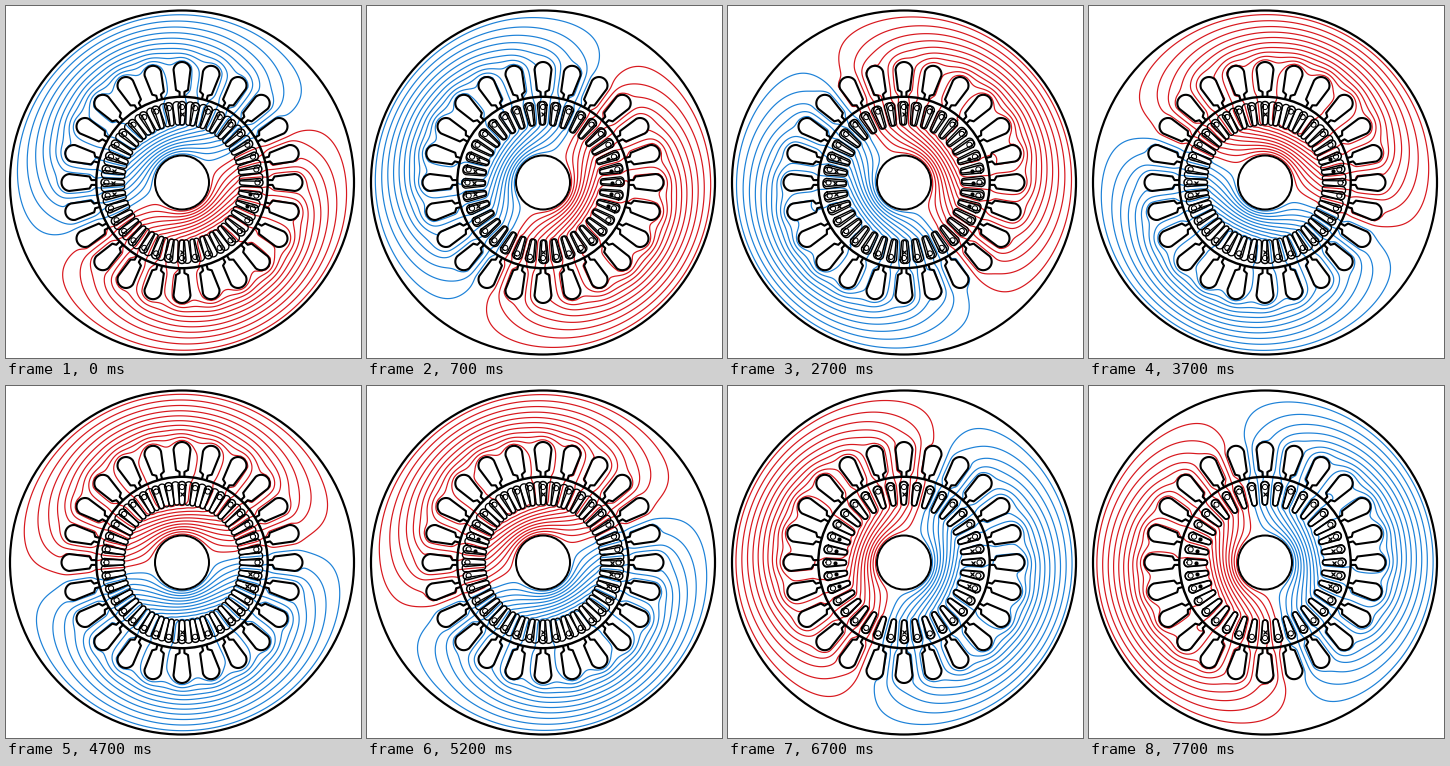
These frames come from a looping animation (355 by 352 pixels, 8 s). A matplotlib script:

```python
import numpy as np
import matplotlib.pyplot as plt
from matplotlib.animation import FuncAnimation
from matplotlib.collections import LineCollection

WIDTH, HEIGHT, DPI = 355, 352, 100
PX = 72 / DPI
SHAFT, GAP, OUTER = 27, 85.7, 172
SLOTS, BARS = 24, 36
STEPS = 17
RED, BLUE = "#d8191f", "#1e82d8"

# Half of the machine is solved; the other half has the opposite sign.
HALF = 240
CELL = np.pi / HALF
LAYERS = round(np.log(OUTER / SHAFT) / CELL)
U = np.linspace(np.log(SHAFT), np.log(OUTER), LAYERS + 1)
THETA = (np.arange(HALF) + 0.5) * CELL


def local(r, theta, count):
    """Radial and sideways position relative to the nearest of count axes."""
    pitch = 2 * np.pi / count
    d = (theta + pitch / 2) % pitch - pitch / 2
    return r * np.cos(d), r * np.sin(d)


def in_slot(r, theta):
    p, q = local(r, theta, SLOTS)
    body = (p > 92) & (p < 112) & (abs(q) < np.interp(p, [92, 112], [6, 8.5]))
    cap = np.hypot(p - 112, q) < 8.5
    neck = (p > 85) & (p <= 92) & (abs(q) < 2.2)
    return body | cap | neck


def in_bar(r, theta):
    p, q = local(r, theta, BARS)
    body = (p > 60) & (p < 77) & (abs(q) < np.interp(p, [60, 77], [2.5, 4]))
    caps = (np.hypot(p - 60, q) < 2.5) | (np.hypot(p - 77, q) < 4)
    slit = (p > 77) & (p < 86) & (abs(q) < 1.2)
    return body | caps | slit


def reluctivity(u, theta):
    r = np.exp(u)[:, None]
    t = theta[None, :]
    air = in_slot(r, t) | in_bar(r, t) | (abs(r - GAP) < 1)
    return np.where(air, 1.0, 1 / 600)


def solve_field():
    """Vector potential for the cosine and sine parts of the slot currents."""
    radial = reluctivity((U[1:] + U[:-1]) / 2, THETA)
    around = reluctivity(U, THETA + CELL / 2)
    r = np.exp(U)[:, None]
    pitch = 2 * np.pi / SLOTS
    axis = np.round(THETA / pitch) * pitch
    density = r**2 * (in_slot(r, THETA[None, :]) & (r > 92))
    load = np.stack([density * np.cos(axis), density * np.sin(axis)], axis=2)

    n = np.arange(HALF)
    nxt = (n + 1) % HALF
    sign = np.where(nxt == 0, 1.0, -1.0)
    inverses, rhs = [], []
    for i in range(1, LAYERS):
        e = around[i]
        block = np.diag(radial[i] + radial[i - 1] + e + np.roll(e, 1))
        block[n, nxt] += sign * e
        block[nxt, n] += sign * e
        b = load[i]
        if inverses:
            c = radial[i - 1]
            block -= c[:, None] * inverses[-1] * c[None, :]
            b = b + c[:, None] * (inverses[-1] @ rhs[-1])
        inverses.append(np.linalg.inv(block))
        rhs.append(b)

    field = np.zeros((LAYERS + 1, HALF, 2))
    for i in range(LAYERS - 1, 0, -1):
        field[i] = inverses[i - 1] @ (rhs[i - 1] + radial[i][:, None] * field[i + 1])
    return np.concatenate([field, -field, field[:, :1]], axis=1)


def place(p, q, angle):
    c, s = np.cos(angle), np.sin(angle)
    return np.column_stack([p * c - q * s, p * s + q * c])


def arc(center, radius, start, end, n=16):
    a = np.radians(np.linspace(start, end, n))
    return center + radius * np.cos(a), radius * np.sin(a)


def slot_outline():
    p, q = arc(112, 8.5, -85, 85, 20)
    p = np.concatenate([[86.5, 90.5, 92.5], p, [92.5, 90.5, 86.5]])
    q = np.concatenate([[-2.4, -2.4, -6], q, [6, 2.4, 2.4]])
    return p, q


def bar_outline():
    top, bottom = arc(77, 4, -85, 85), arc(60, 2.5, 95, 265)
    p = np.concatenate([top[0], bottom[0], top[0][:1]])
    q = np.concatenate([top[1], bottom[1], top[1][:1]])
    return p, q


def ring(shape, count, shift=0.0):
    return [place(*shape, 2 * np.pi * k / count + shift) for k in range(count)]


def black_lines(segments, width):
    lines = LineCollection(segments, colors="black", linewidths=width * PX,
                           capstyle="round", joinstyle="round", zorder=3)
    return ax.add_collection(lines)


def flux_axis(step):
    return np.radians(28 + 16 * step)


fig = plt.figure(figsize=(WIDTH / DPI, HEIGHT / DPI), dpi=DPI, facecolor="white")
ax = fig.add_axes([0, 0, 1, 1])
ax.axis("off")

# Flux lines, one set for each step
part = solve_field()
theta = (np.arange(2 * HALF + 1) + 0.5) * CELL
radius = np.exp(U)[:, None]
X, Y = radius * np.cos(theta), radius * np.sin(theta)
levels = (np.arange(11) + 0.65) / 11.3 * np.hypot(part[..., 0], part[..., 1]).max()
flux = []
for step in range(STEPS):
    pole = flux_axis(step) - np.pi / 2
    potential = part[..., 0] * np.cos(pole) + part[..., 1] * np.sin(pole)
    flux.append(ax.contour(X, Y, potential, np.concatenate([-levels[::-1], levels]),
                           colors=[BLUE] * 11 + [RED] * 11, linestyles="solid",
                           linewidths=1.2 * PX, zorder=2))

# Machine outline
for r, width in ((OUTER, 2.2), (GAP, 2.4), (SHAFT, 2)):
    ax.add_patch(plt.Circle((0, 0), r, fill=False, lw=width * PX, zorder=3))
black_lines(ring(slot_outline(), SLOTS), 2.1)
black_lines(ring(bar_outline(), BARS), 1.5)
black_lines(ring(arc(75.5, 2.6, 0, 360), BARS), 1)
moving_bars = black_lines([], 1.3)

# Current marks in the bars
dots, = ax.plot([], [], "o", color="black", ms=4.2 * PX, mew=0, zorder=4)
crosses, = ax.plot([], [], "x", color="black", ms=5 * PX, mew=1.2 * PX, zorder=4)
bar_angle = 2 * np.pi * np.arange(BARS) / BARS
beside = abs(np.cos(bar_angle)) > np.cos(np.radians(25))
upright = abs(np.sin(bar_angle)) > np.cos(np.radians(5))

ax.set_xlim(-176, WIDTH - 176)
ax.set_ylim(176.5 - HEIGHT, 176.5)


def update(frame):
    step = (frame + 3) // 5
    for k, lines in enumerate(flux):
        lines.set_visible(k == step)
    axis = flux_axis(step)
    shift = np.pi / BARS * np.cos(axis) ** 2
    moving_bars.set_segments(ring(bar_outline(), BARS, shift))
    strength = np.sin(axis - bar_angle)
    outward = beside & (strength > 0.55)
    inward = (beside & (strength < -0.3)) | upright
    for marks, chosen in ((dots, outward), (crosses, inward)):
        a = bar_angle[chosen]
        marks.set_data(69 * np.cos(a), 69 * np.sin(a))
    return [*flux, moving_bars, dots, crosses]


anim = FuncAnimation(fig, update, frames=80, interval=100, repeat=True, repeat_delay=0)
plt.show()
```
